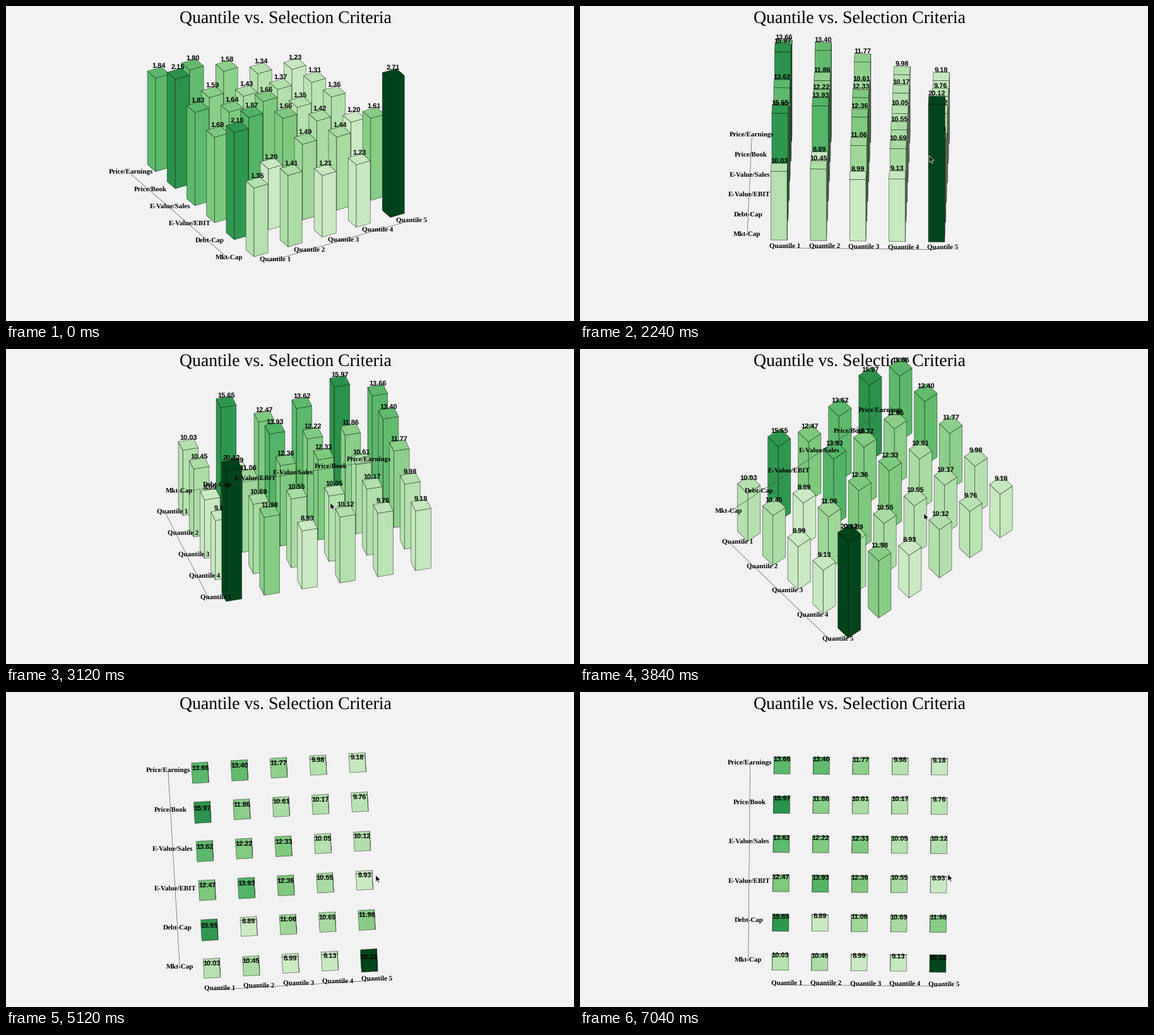
A matplotlib script for the animation above (7.12 s loop, 900 px wide and 500 px high).

```python
import matplotlib.pyplot as plt
import numpy as np
from matplotlib.animation import FuncAnimation
from matplotlib.collections import PolyCollection
from matplotlib.patches import Polygon

plt.rcParams["text.hinting"] = "none"

W, H, DPI = 900, 500, 100
FRAMES, INTERVAL = 89, 80
PX = 72 / DPI                     # one pixel in points

CX, CY = 443.3, 304               # pivot on the stage
STEP, HALF = 62.4, 12.8           # grid spacing and half bar width
RISE = 252.5 / 20.12              # bar height per unit
START_SCALE = 0.13447
DRAG = 0.76                       # pointer pixels per degree

CRITERIA = ["Mkt-Cap", "Debt-Cap", "E-Value/EBIT",
            "E-Value/Sales", "Price/Book", "Price/Earnings"]
QUANTILES = [f"Quantile {i}" for i in range(1, 6)]
VALUES = np.array([
    [10.03, 10.45, 8.99, 9.13, 20.12],
    [15.65, 8.89, 11.06, 10.69, 11.98],
    [12.47, 13.93, 12.36, 10.55, 8.93],
    [13.62, 12.22, 12.33, 10.05, 10.12],
    [15.97, 11.86, 10.61, 10.17, 9.76],
    [13.66, 13.40, 11.77, 9.98, 9.18],
])
U = (np.arange(5) - 2) * STEP
V = (np.arange(6) - 2) * STEP
CRITERIA_U, QUANTILE_V, QUANTILE_DX = -175.5, -162, 10.3

# turning points of the drag: frame, azimuth, elevation
VIEW = [(20, -30, 30), (28, 1.35, 30.1), (36, 71.5, 35), (42, 76.5, 34.2),
        (48, 50.4, 53), (54, 13.4, 75.6), (61, -6.5, 93), (64, -3.4, 92.3),
        (68, -6, 92), (74, 0.5, 90.5)]
GRAB, HOLD = 19, 48               # pointer appears, pointer locks to the drag

ARROW = np.array([[0, 0], [0, 10.5], [2.5, 8.3], [4.2, 12.2],
                  [5.8, 11.5], [4.2, 7.7], [7.6, 7.5]])


def green(value):
    return plt.get_cmap("Greens")(1 - 0.068 * (VALUES.max() - value))


def view_at(frame):
    keys, azimuth, elevation = zip(*VIEW)
    return np.interp(frame, keys, azimuth), np.interp(frame, keys, elevation)


def pointer_at(frame):
    """The pointer follows the drag, running ahead of it at first."""
    azimuth, elevation = view_at(frame)
    lead = np.interp(frame, [28, HOLD], [29, 0])
    return (583.3 - DRAG * azimuth - lead,
            289.3 + DRAG * (elevation - 90.5) - 0.2 * lead)


class Camera:
    """Orthographic turntable view."""

    def __init__(self, azimuth, elevation):
        a, e = np.radians([azimuth, elevation])
        self.ca, self.sa, self.ce, self.se = np.cos(a), np.sin(a), np.cos(e), np.sin(e)

    def project(self, u, v, z=0):
        x = CX + u * self.ca + v * self.sa
        y = CY + (u * self.sa - v * self.ca) * self.se - z * self.ce
        return x, y

    def depth(self, u, v):
        return (u * self.sa - v * self.ca) * self.ce

    def faces(self, u, v, z):
        """The two visible sides and the top."""
        h = HALF
        near_u = u + h * np.sign(self.sa * self.ce)
        near_v = v - h * np.sign(self.ca * self.ce)
        ends_u = [(near_u, v - h), (near_u, v + h)]
        ends_v = [(u - h, near_v), (u + h, near_v)]
        quads = [[(*p, 0), (*q, 0), (*q, z), (*p, z)] for p, q in (ends_u, ends_v)]
        quads.append([(u - h, v - h, z), (u + h, v - h, z),
                      (u + h, v + h, z), (u - h, v + h, z)])
        return [[self.project(*p) for p in quad] for quad in quads]


fig = plt.figure(figsize=(W / DPI, H / DPI), dpi=DPI, facecolor="#f2f2f2")
ax = fig.add_axes([0, 0, 1, 1])
ax.set_xlim(0, W)
ax.set_ylim(H, 0)
ax.axis("off")


def label(s, size, family, weight="bold", x=0, y=0, z=51):
    return ax.text(x, y, s, fontsize=size * PX, family=family, weight=weight,
                   color="black", ha="center", va="baseline", zorder=z)


label("Quantile vs. Selection Criteria", 27.8, "Liberation Serif", "normal", CX, 26, 0)

bars = []
for r, c in np.ndindex(VALUES.shape):
    value = VALUES[r, c]
    body = PolyCollection([], facecolors=[green(value)], edgecolors=[(0, 0, 0, 0.6)],
                          linewidths=0.7 * PX, joinstyle="round")
    ax.add_collection(body, autolim=False)
    bars.append((U[c], V[r], value, body, label("", 11, "Liberation Sans")))

row_labels = [label(s, 11, "Liberation Serif") for s in CRITERIA]
col_labels = [label(s, 11, "Liberation Serif") for s in QUANTILES]
axis_lines = [ax.plot([], [], color="#444444", lw=0.6 * PX, zorder=50)[0] for _ in range(2)]
pointer = ax.add_patch(Polygon(ARROW, closed=True, fc="black", ec="white",
                               lw=0.7 * PX, zorder=60))


def draw(frame):
    cam = Camera(*view_at(frame))
    scale = min(1, START_SCALE * (frame + 1))

    ordered = sorted(bars, key=lambda b: cam.depth(b[0], b[1]))
    for rank, (u, v, value, body, text) in enumerate(ordered, 1):
        z = value * RISE
        body.set_verts(cam.faces(u, v, z))
        body.set_zorder(rank)
        x, y = cam.project(u, v, z)
        text.set_position((x, y - 7.5))
        text.set_text(f"{value * scale:.2f}")
        text.set_zorder(rank + 0.5)

    rows = cam.project(CRITERIA_U, V)
    cols = cam.project(U, QUANTILE_V)
    for line, pts in zip(axis_lines, (rows, cols)):
        line.set_data(*pts)
    for text, x, y in zip(row_labels, *rows):
        text.set_position((x, y))
    for text, x, y in zip(col_labels, *cols):
        text.set_position((x + QUANTILE_DX, y))

    pointer.set_visible(frame >= GRAB)
    pointer.set_xy(ARROW + pointer_at(frame))
    return []


anim = FuncAnimation(fig, draw, frames=FRAMES, interval=INTERVAL,
                     init_func=lambda: draw(0), repeat=True, repeat_delay=0)
plt.show()
```
